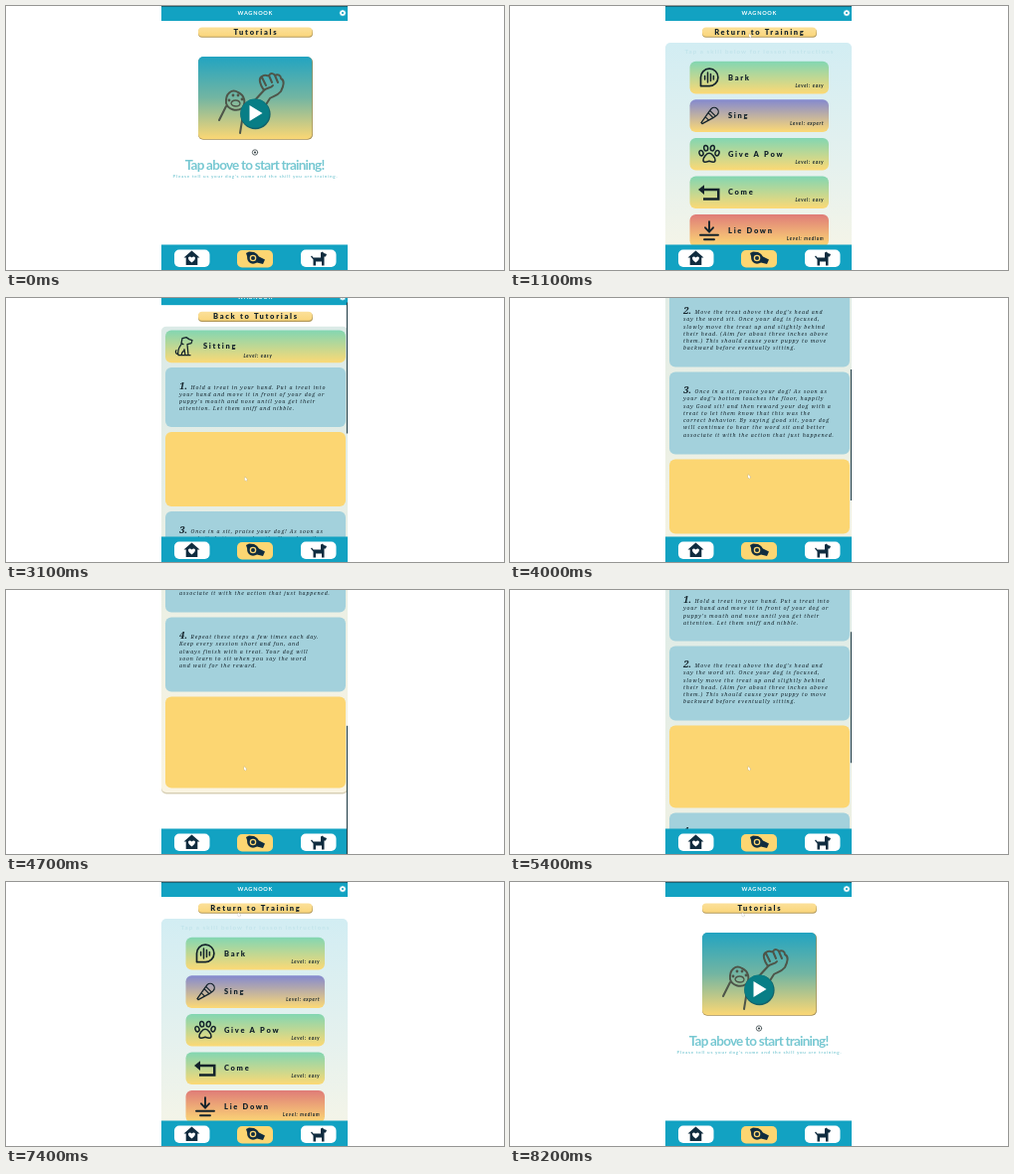
Animation, 500 px wide and 266 px high, one loop 8300 ms. Source, as an HTML page with a canvas:

```html
<!DOCTYPE html>
<html lang="en">
<head>
<meta charset="utf-8">
<title>Dog training app</title>
<style>
html, body { margin: 0; width: 100%; height: 100%; overflow: hidden; background: #fff; }
canvas { display: block; width: 100vw; height: 100vh; }
</style>
</head>
<body>
<canvas id="stage"></canvas>
<script>
const canvas = document.getElementById('stage');
const ctx = canvas.getContext('2d');
const W = 500, H = 266, LOOP = 8300, STEP = 100;
const LEFT = 156, RIGHT = 343, MID = 250;
const TEAL = '#12a2c2', INK = '#14232b', NAVY = '#102c3f', YELLOW = '#fcd672';
const GREEN = '#82d6b2', PURPLE = '#8489cf', RED = '#df7c78';

const SKILLS = [
  ['Bark', 'easy', GREEN, bubble], ['Sing', 'expert', PURPLE, mic],
  ['Give A Pow', 'easy', GREEN, paw], ['Come', 'easy', GREEN, comeBack],
  ['Lie Down', 'medium', RED, lieDown], ['Sitting', 'easy', GREEN, sittingDog]
];

// top, height, lines
const LESSONS = [
  [79.4, 60, ['Hold a treat in your hand. Put a treat into', 'your hand and move it in front of your dog or',
    'puppy\u2019s mouth and nose until you get their', 'attention. Let them sniff and nibble.']],
  [144.4, 75, ['Move the treat above the dog\u2019s head and', 'say the word sit. Once your dog is focused,',
    'slowly move the treat up and slightly behind', 'their head. (Aim for about three inches above',
    'them.) This should cause your puppy to move', 'backward before eventually sitting.']],
  [224.4, 83, ['Once in a sit, praise your dog! As soon as', 'your dog\u2019s bottom touches the floor, happily',
    'say Good sit! and then reward your dog with a', 'treat to let them know that this was the',
    'correct behavior. By saying good sit, your dog', 'will continue to hear the word sit and better',
    'associate it with the action that just happened.']],
  [312.4, 75, ['Repeat these steps a few times each day.', 'Keep every session short and fun, and',
    'always finish with a treat. Your dog will', 'soon learn to sit when you say the word', 'and wait for the reward.']],
  [392.4, 92, ['Once your dog knows the word sit, try it', 'without a treat in your hand. Praise your',
    'dog each time, and practice in new places', 'so that your dog learns to listen to you', 'wherever you are.']]
];

// time, value(s)
const PAGES = [[0, 'home'], [1000, 'list'], [2800, 'lesson'], [7000, 'list'], [7700, 'home']];
const LIST_SCROLL = [[1200, 0], [2100, 79], [2800, 79], [2900, 0]];
const LESSON_SCROLL = [[3000, 0], [3500, 90], [4000, 150], [4600, 285], [4800, 285], [5400, 88], [5800, 88], [6300, 0]];
const POINTER = [[0, 268, 205], [800, 240, 28], [1100, 240, 28], [1500, 241, 214], [2300, 241, 214], [2700, 242, 188],
  [3300, 239, 178], [5800, 239, 178], [6500, 230, 66], [6900, 233, 31], [8200, 233, 31]];

const ease = k => k * k * (3 - 2 * k);

function track(keys, t, i = 1) {
  if (t <= keys[0][0]) return keys[0][i];
  for (let n = 1; n < keys.length; n++) {
    const a = keys[n - 1], b = keys[n];
    if (t <= b[0]) return a[i] + (b[i] - a[i]) * ease((t - a[0]) / (b[0] - a[0]));
  }
  return keys[keys.length - 1][i];
}

function box(x, y, w, h, r, fill) {
  ctx.beginPath();
  ctx.roundRect(x, y, w, h, r);
  ctx.fillStyle = fill;
  ctx.fill();
}

function fade(y, h, ...stops) {
  const g = ctx.createLinearGradient(0, y, 0, y + h);
  stops.forEach((c, i) => g.addColorStop(i / (stops.length - 1), c));
  return g;
}

function text(str, x, y, font, color, spacing = 0, align = 'left') {
  ctx.font = font;
  ctx.letterSpacing = spacing + 'px';
  ctx.textAlign = align;
  ctx.textBaseline = 'alphabetic';
  ctx.fillStyle = color;
  ctx.fillText(str, x + (align === 'left' ? 0 : spacing / 2), y);
}

const title = (str, x, y, align) => text(str, x, y, '900 7.5px Lato, sans-serif', INK, 1.7, align);
const level = (name, x, y, align) =>
  text('Level: ' + name, x, y, 'italic 700 4.6px Lato, sans-serif', INK, 0.75, align);

function line(d, width = 1.6, color = INK) {
  ctx.lineWidth = width;
  ctx.strokeStyle = color;
  ctx.lineCap = ctx.lineJoin = 'round';
  ctx.stroke(new Path2D(d));
}

function solid(d, color = INK) {
  ctx.fillStyle = color;
  ctx.fill(new Path2D(d));
}

function disc(x, y, r, color) {
  ctx.beginPath();
  ctx.arc(x, y, r, 0, 7);
  ctx.fillStyle = color;
  ctx.fill();
}

function at(x, y, draw) {
  ctx.save();
  ctx.translate(x, y);
  draw();
  ctx.restore();
}

// Icons, each around its own centre
function bubble() {
  line('M-8.5 8.5V0A8.7 8.7 0 1 1 0 8.5Z', 1.7);
  line('M-4.4 -1.5V2M-1.5 -5V5M1.5 -3.5V3.5M4.4 -1.5V2', 1.5);
}
function mic() {
  line('M-1 -3L2 -7A4.2 4.2 0 0 1 8 -1L4 2ZM-1 -3L-8 7L-7 8L4 2M1 -5L6 0M-3 2L-1 4', 1.3);
}
function paw() {
  line('M0 -1C-3 -1 -6 4 -6 6C-6 9 -3 8 0 7C3 8 6 9 6 6C6 4 3 -1 0 -1Z', 1.5);
  for (const [x, y] of [[-8, -1], [-3.3, -6], [3.3, -6], [8, -1]]) {
    ctx.beginPath();
    ctx.ellipse(x, y, 2, 2.7, x / 25, 0, 7);
    ctx.stroke();
  }
}
function comeBack() {
  solid('M-11 -2.7L-5 -7.5V-4H10.5V8H-6V5.4H8V-1.4H-5V2.2Z');
}
function lieDown() {
  line('M0 -9V1M-4 -3L0 1.4L4 -3M-9 4.5H9M-5 9H5', 1.9);
}
function sittingDog() {
  line('M-2 -8L2 -9L5 -7L8 -6L7 -3L3 -2L4 9H1L0 3M-2 -8L-3 -3L-1 -2M-3 -2C-6 2 -7 5 -6 9H1M-6 8C-9 8 -9 5 -8 4M-3 9C-3 6 -1 5 0 4M4 9H6', 1.25);
}
function house() {
  solid('M0 -7.5L8 -.5H5.8V7H-5.8V-.5H-8Z', NAVY);
  solid('M0 4.5C-6 .5 -3 -3 0 -.6C3 -3 6 .5 0 4.5Z', '#fff');
}
function whistle() {
  solid('M-9 -5L-6 -6.5L-1 -6L3 -2L10 1.5L8 6L2 4.5L-3 5L-7 1Z', NAVY);
  disc(-2, 0, 5.8, NAVY);
  disc(-2, 0, 3.3, YELLOW);
  disc(-2, 0, 2, NAVY);
}
function standingDog() {
  solid('M-7 -3L-5.5 -1H2V-6L4 -7L5 -5.5L8 -4.5L7 -2H5.5V7H3V3H-3V7H-5.5V1L-8 -2Z', NAVY);
}

function header(y) {
  ctx.fillStyle = TEAL;
  ctx.fillRect(LEFT, y, RIGHT - LEFT, 15);
  ctx.fillStyle = '#164c5c';
  ctx.fillRect(LEFT, y, RIGHT - LEFT, 0.7);
  text('WAGNOOK', MID, y + 9.3, '700 5.6px Lato, sans-serif', '#fff', 0.7, 'center');
  disc(338, y + 7, 2.6, '#fff');
  for (let i = 0; i < 8; i++) {
    disc(338 + 2.6 * Math.cos(i * Math.PI / 4), y + 7 + 2.6 * Math.sin(i * Math.PI / 4), 0.7, '#fff');
  }
  disc(338, y + 7, 1.1, TEAL);
}

function topButton(label, y) {
  box(193, y + 22.5, 115, 9.3, 4, '#b39a5c');
  box(193, y + 21.5, 114.5, 9.2, 4, fade(y + 21.5, 9, '#fbe09a', '#fad67c'));
  title(label, MID, y + 29.2, 'center');
}

function footer() {
  ctx.fillStyle = TEAL;
  ctx.fillRect(LEFT, 240.5, RIGHT - LEFT, H - 240.5);
  box(169, 245.5, 35.5, 17.5, 5, '#fff');
  box(232, 246, 36, 17.5, 5, YELLOW);
  box(296, 245.5, 35.5, 17.5, 5, '#fff');
  at(186.5, 254, house);
  at(250, 254, whistle);
  at(314, 254.5, standingDog);
}

function home() {
  header(0);
  topButton('Tutorials', 0);
  box(193, 51.5, 115, 83.3, 5, '#a58f56');
  box(193, 51, 114.3, 83, 5, fade(51, 83, '#22a4c1', '#73b5a2', '#fbd774'));
  const brown = '#4d5549';
  line('M214 115L221 101M235 128L239 103M221 98C220 88 227 83 233 87C240 90 241 98 237 103C231 107 223 104 221 98Z', 2, brown);
  line('M226 98C227 94 234 94 235 98C235 102 227 102 226 98Z', 1.3, brown);
  for (const [x, y] of [[224, 95], [228, 90], [233, 90], [237, 94]]) disc(x, y, 1.4, brown);
  line('M248 97L259 85C255 79 253 73 257 71C260 68 262 71 264 70C266 67 269 68 270 70C273 68 276 70 276 73C280 75 279 80 276 86C272 91 268 91 265 93L253 112M257 72L261 80M264 70L267 77M270 70L273 77M259 85C262 82 266 83 268 80', 2, brown);
  disc(250.4, 109, 15.2, '#12616a');
  disc(250, 108.2, 14.6, '#087e86');
  solid('M244.5 100V116L257.5 108Z', '#fff');
  ctx.beginPath();
  ctx.arc(250, 147.5, 2.7, 0, 7);
  ctx.lineWidth = 0.8;
  ctx.strokeStyle = '#39464a';
  ctx.stroke();
  disc(250, 147.5, 1.1, '#39464a');
  text('Tap above to start training!', MID, 164.7, '700 13.5px Lato, sans-serif', '#77c8d2', -0.75, 'center');
  text('Please tell us your dog\u2019s name and the skill you are training.', MID, 172.7,
    '700 4.5px Lato, sans-serif', '#83ccd6', 0.77, 'center');
}

function list(scroll) {
  const y0 = -scroll;
  header(y0);
  topButton('Return to Training', y0);
  box(LEFT, y0 + 38.5, RIGHT - LEFT, 246, 5, '#d8d0b6');
  box(LEFT, y0 + 37, RIGHT - LEFT, 246, 5, fade(y0 + 37, 246, '#d2edf3', '#e5f1ee', '#fbf6e5'));
  text('Tap a skill below for lesson instructions', MID, y0 + 47.5,
    '700 6.2px Lato, sans-serif', '#c2e4eb', 1.05, 'center');
  SKILLS.forEach(([name, grade, color, icon], i) => {
    const y = y0 + 55.8 + i * 38.55;
    box(180.5, y, 139.5, 32.6, 6, fade(y, 32.6, color, '#fcd975'));
    at(200, y + 16.3, icon);
    title(name, 219, y + 18.8);
    level(grade, 315, y + 25.8, 'right');
  });
}

function lesson(scroll, px, py) {
  const y0 = -scroll, headTop = y0 + 1.5;
  box(LEFT, y0 + 39.5, RIGHT - LEFT, 451, 5, '#d8d0b6');
  box(LEFT, y0 + 38, RIGHT - LEFT, 451, 5, fade(y0 + 38, 451, '#dbeae7', '#e9efe5', '#faf4e2'));
  ctx.fillStyle = '#10191c';
  ctx.fillRect(LEFT, y0, RIGHT - LEFT, 1.5);
  header(headTop);
  topButton('Back to Tutorials', headTop);
  box(160, y0 + 41.8, 181, 32.8, 6, fade(y0 + 41.8, 33, GREEN, '#fcd975'));
  at(179, y0 + 58, sittingDog);
  title('Sitting', 198, y0 + 60.5);
  level('easy', 238.5, y0 + 69);
  LESSONS.forEach(([top, h, lines], i) => {
    const y = y0 + top;
    const hover = px > 160 && px < 341 && py >= y && py <= y + h;
    box(160, y, 181, h, 6, hover ? YELLOW : '#a3d1dc');
    if (hover) return;
    text(i + 1 + '.', 174, y + 22, 'italic 900 9.6px "Noto Serif", serif', INK);
    lines.forEach((str, n) => text(str, n ? 174 : 185.5, y + 21.5 + n * 7.3,
      'italic 500 5.2px "Noto Serif", serif', INK, 0.82));
  });
}

function scrollThumb(top, height) {
  ctx.fillStyle = '#26424b';
  ctx.fillRect(341.9, top, 1.1, height);
}

function pointer(x, y) {
  at(x, y, () => {
    const arrow = 'M0 0V3.4L.9 2.8L1.5 4L2.1 3.7L1.6 2.5H2.6Z';
    line(arrow, 0.4, '#aaa');
    solid(arrow, '#fff');
  });
}

function render(t) {
  const page = PAGES.filter(([start]) => start <= t).pop()[1];
  const px = track(POINTER, t, 1), py = track(POINTER, t, 2);
  const k = devicePixelRatio || 1;
  const w = Math.round(innerWidth * k), h = Math.round(innerHeight * k);
  if (canvas.width !== w || canvas.height !== h) {
    canvas.width = w;
    canvas.height = h;
  }
  ctx.setTransform(w / W, 0, 0, h / H, 0, 0);
  ctx.fillStyle = '#fff';
  ctx.fillRect(0, 0, W, H);
  ctx.save();
  ctx.beginPath();
  ctx.rect(LEFT, 0, RIGHT - LEFT, H);
  ctx.clip();
  if (page === 'home') {
    home();
    footer();
  } else if (page === 'list') {
    const scroll = track(LIST_SCROLL, t);
    list(scroll);
    footer();
    if (scroll > 0) scrollThumb(scroll * 0.75, 207);
  } else {
    const scroll = track(LESSON_SCROLL, t);
    lesson(scroll, px, py);
    footer();
    if (t > 3000 && t < 6800) scrollThumb(scroll * 0.48, 132);
  }
  if (t > 0) pointer(px, py);
  ctx.restore();
}

const start = performance.now();
function tick() {
  const t = (performance.now() - start) % LOOP;
  render(Math.floor(t / STEP) * STEP);
  requestAnimationFrame(tick);
}
tick();
</script>
</body>
</html>
```
